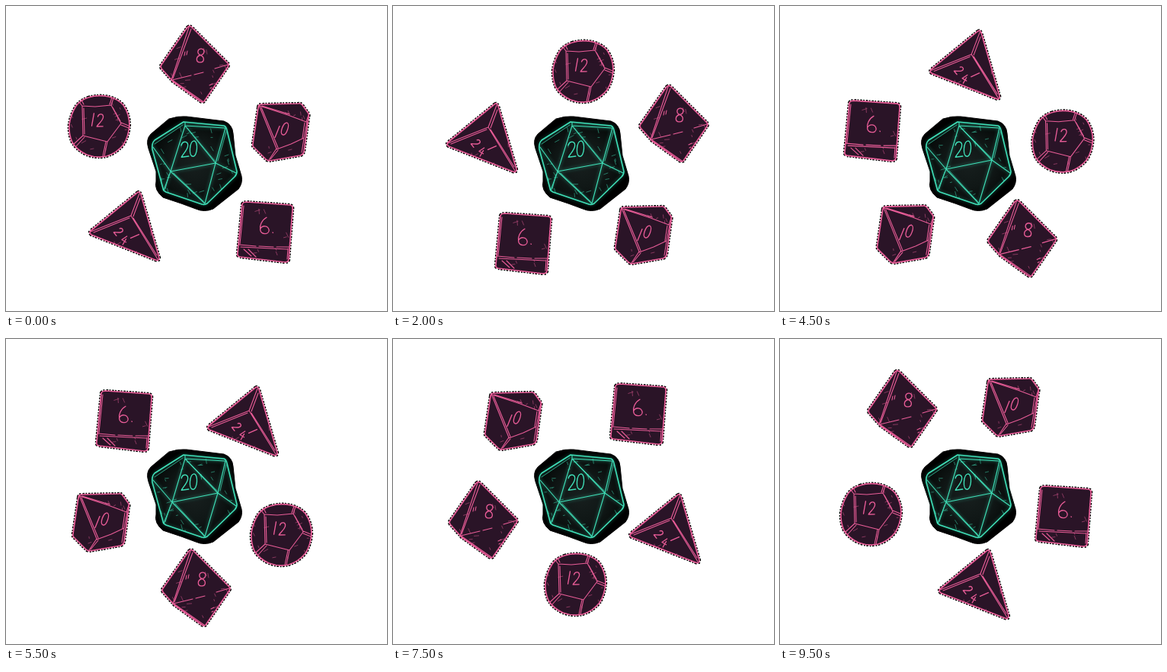
Write an HTML page that moves like this. It is 500 px wide and 400 px high and loops after 10 s.

```html
<!DOCTYPE html>
<html lang="en">
<head>
<meta charset="utf-8">
<title>Dice ring</title>
<style>
html, body { margin: 0; width: 100%; height: 100%; overflow: hidden; background: #fff; }
svg { display: block; width: 500px; height: 400px; }
path { fill: none; stroke-linecap: round; stroke-linejoin: round; }
.die { stroke: #e85c97; }
.d20 { stroke: #3fe0b8; }
</style>
</head>
<body>
<svg id="stage" viewBox="0 0 500 400" role="img" aria-label="Dice circling a twenty-sided die">
  <defs>
    <radialGradient id="shade">
      <stop offset="0" stop-color="#171f1e"/>
      <stop offset=".6" stop-color="#101716"/>
      <stop offset="1" stop-color="#070b0a"/>
    </radialGradient>
    <filter id="soft"><feGaussianBlur stdDeviation="2"/></filter>
  </defs>
</svg>
<script>
const NS = 'http://www.w3.org/2000/svg';
const stage = document.getElementById('stage');
const STEP = 500, STEPS = 20, CX = 243, CY = 202;

// Hand-lettered digits in a box 8 wide and 17 high
const GLYPHS = {
  0: 'M4 0C-1 1-1 17 4 17C9 17 9 0 4 0Z',
  1: 'M4 0L4 17',
  2: 'M0 4C1-1 8-1 7 5C6 10 2 13 0 17L8 16',
  4: 'M5 0L0 10L9 10M6 5L6 17',
  6: 'M6 0C1 3-1 9 0 13C1 18 9 18 9 13C8 8 2 8 0 12',
  8: 'M4 8C-1 6 0 0 5 0C10 1 9 7 4 8C-2 10-1 17 4 17C10 17 10 10 4 8',
  '.': 'M4 16L4.3 16.3'
};

// Digits are [text, x, y, scale, turn]; keys are centres at the steps in KEYS
const KEYS = [0, 4, 7, 11, 13, 15, 19];
const DICE = [
  { name: '8', at: [248, 76],
    edge: 'M238 28Q241 25 244 28L291 75Q293 77 291 80L260 125Q258 127 255 125L219 99L204 82Q202 79 204 77Z',
    inner: 'M240 28L217 97M243 30L219 95M218 97L258 125M218 97L243 91M247 90L259 87M274 82L291 77M235 60L234 65M238 59L237 64M267 104L271 102M268 108L270 107',
    digits: [['8', 255, 65, 1.05, 4]],
    keys: [248, 76, 369, 154, 365, 248, 250, 326, 167, 305, 119, 237, 161, 91] },
  { name: '10', at: [361, 166],
    edge: 'M331 133Q331 129 336 129L383 128Q387 127 389 130L397 141Q398 143 397 146L391 191Q390 195 386 196L346 203Q343 203 341 201L325 185Q323 183 324 180Z',
    inner: 'M332 130L355 187L345 202M335 133L357 186M333 131L370 143L394 152L397 143M336 131L372 142M355 188L374 181L391 173L395 152M392 153L389 173M357 189L347 201M391 174L388 192',
    digits: [['1', 356, 165, .94, 22], ['0', 366, 161, .98, 20]],
    keys: [361, 166, 329, 301, 231, 328, 125, 241, 127, 167, 158, 108, 303, 90] },
  { name: '6', at: [340, 296],
    edge: 'M310 260Q311 257 316 257L373 261Q377 262 376 267L371 333Q370 336 366 336L307 329Q303 328 304 324Z',
    inner: 'M306 313L328 315M332 315L351 316M355 316L372 316M308 316L369 319M312 319L322 328M318 319L328 329M370 318L369 332M312 262L307 312',
    digits: [['6', 339, 288, 1.28, 2], ['.', 350, 288, 1.2, 0]],
    keys: [340, 296, 171, 311, 119, 228, 155, 107, 236, 89, 322, 98, 372, 232] },
  { name: '4', at: [155, 289],
    edge: 'M172 245Q175 242 177 247L201 330Q201 335 196 333L112 300Q108 297 112 294Z',
    inner: 'M111 296L164 275L175 246M164 275L199 332M115 297L162 278M167 276L176 252M167 278L198 327',
    digits: [['2', 148, 296, .72, 58], ['4', 155, 307, .72, 30], ['1', 169, 302, .7, 66]],
    keys: [155, 289, 116, 173, 164, 94, 310, 108, 360, 169, 356, 249, 254, 322] },
  { name: '12', at: [122, 158],
    edge: 'M108 120Q121 116 135 119Q147 122 154 130Q162 142 162 156Q161 171 154 182Q145 193 132 197Q119 200 106 195Q93 189 87 179Q82 168 83 155Q85 142 92 131Q98 123 108 120Z',
    inner: 'M100 131L117 132L138 130L151 154L133 178L101 170ZM102 134L103 168M100 131L96 126M102 129L99 123M138 130L141 121M136 129L139 120M151 153L161 157M151 156L161 160M133 178L129 197M131 178L127 197M101 170L89 181M103 172L92 184M140 133L150 151',
    digits: [['1', 114, 149, .98, 10], ['2', 124, 150, 1, 6]],
    keys: [122, 158, 249, 86, 332, 108, 361, 257, 323, 306, 239, 322, 119, 230] }
];

function add(parent, tag, attrs) {
  const el = document.createElementNS(NS, tag);
  for (const key in attrs) el.setAttribute(key, attrs[key]);
  return parent.appendChild(el);
}

function line(parent, d, width, extra) {
  return add(parent, 'path', { d, 'stroke-width': width, ...extra });
}

function random(seed) {
  return () => (seed = seed * 16807 % 2147483647) / 2147483647;
}

function drawDigit(parent, [ch, x, y, scale, turn], width) {
  line(parent, GLYPHS[ch], width / scale, {
    transform: `translate(${x} ${y}) rotate(${turn}) scale(${scale}) translate(-4 -8.5)`
  });
}

// Short scratches scattered around the rim of a face
function scratches(parent, clip, x, y, radius, count, seed) {
  const rnd = random(seed);
  let d = '';
  for (let i = 0; i < count; i++) {
    const a = rnd() * 2 * Math.PI, r = radius * (.55 + .45 * rnd());
    const turn = (i % 2 ? -.5 : 1) + rnd() * .5, len = 2 + rnd() * 5;
    d += `M${(x + r * Math.cos(a)).toFixed(1)} ${(y + r * Math.sin(a)).toFixed(1)}`
       + `l${(len * Math.cos(turn)).toFixed(1)} ${(len * Math.sin(turn)).toFixed(1)}`;
  }
  line(parent, d, .7, { 'clip-path': `url(#${clip})`, opacity: .7 });
}

function clipFor(id, d) {
  add(add(stage.querySelector('defs'), 'clipPath', { id }), 'path', { d });
}

function drawDie(die, i) {
  const clip = 'clip' + die.name;
  clipFor(clip, die.edge);
  die.node = add(stage, 'g', { class: 'die', 'aria-label': die.name });
  line(die.node, die.edge, 4.2, {
    style: 'stroke:#000;stroke-linecap:butt', 'stroke-dasharray': '2.6 1.4 1.8 1.8'
  });
  line(die.node, die.edge, 1.7, { style: 'fill:#2a1427' });
  line(die.node, die.inner, 1.1);
  scratches(die.node, clip, ...die.at, 42, 17, 911 + i * 137);
  die.digits.forEach(g => drawDigit(die.node, g, 1.35));
}

const BLOB = 'M214 148Q226 144 237 145L286 151Q297 155 298 167L301 196L309 223Q311 232 305 240L272 266Q260 271 249 266L230 259L206 251Q194 241 197 230L197 217L187 187Q183 175 190 168Z';

function drawCentre(left, right, seed) {
  const g = add(stage, 'g', { class: 'd20', 'aria-label': '20' });
  const edge = 'M233 152L286 157Q289 158 290 163L303 217Q303 221 300 224L264 259Q261 261 257 260L210 244Q206 242 206 239L192 188Q191 180 195 176Z';
  const a = left.join(' '), b = right.join(' ');
  const net = `M235 157L${a}L${b}ZM193 185L${a}L207 242M${a}L261 259L${b}L288 160M${b}L302 219M235 157L287 160M235 153L235 157`;
  const clip = 'clip20' + seed;
  clipFor(clip, edge);
  line(g, BLOB, 1, { style: 'fill:#000;stroke:#000' });
  line(g, edge, 0, { style: 'fill:url(#shade);stroke:none' });
  line(g, edge + net, 3, { filter: 'url(#soft)', opacity: .28 });
  line(g, edge, 1.6);
  line(g, net, 1.1);
  line(g, `M238 160L${right[0] - 1} ${right[1] - 3}M${left[0] + 4} ${left[1] + 2}L259 256`
    + `M${left[0] - 2} ${left[1] + 4}L209 240M${right[0] + 3} ${right[1] - 3}L289 165M195 181L232 156`, .7);
  scratches(g, clip, 247, 207, 52, 34, seed);
  [['2', 235, 188, 1.2, 0], ['0', 246, 187, 1.2, 4]].forEach(d => drawDigit(g, d, 1.4));
  return g;
}

const centres = [
  drawCentre([216, 217], [275, 206], 4021),
  drawCentre([218, 214], [278, 202], 7753)
];
DICE.forEach(drawDie);

function polar(x, y) {
  return [Math.atan2(y - CY, x - CX), Math.hypot(x - CX, y - CY)];
}

// Moves clockwise around the centre between two neighbouring key places
function place(die, step) {
  let i = KEYS.length - 1;
  while (KEYS[i] > step) i--;
  const n = (i + 1) % KEYS.length, span = (KEYS[n] || STEPS) - KEYS[i];
  const p = (step - KEYS[i]) / span;
  const [a0, r0] = polar(die.keys[2 * i], die.keys[2 * i + 1]);
  let [a1, r1] = polar(die.keys[2 * n], die.keys[2 * n + 1]);
  if (a1 < a0) a1 += 2 * Math.PI;
  const a = a0 + (a1 - a0) * p, r = r0 + (r1 - r0) * p;
  return [CX + r * Math.cos(a), CY + r * Math.sin(a)];
}

function render(time) {
  const step = Math.floor(time / STEP) % STEPS;
  for (const die of DICE) {
    const [x, y] = place(die, step);
    die.node.setAttribute('transform',
      `translate(${(x - die.at[0]).toFixed(1)} ${(y - die.at[1]).toFixed(1)})`);
  }
  centres.forEach((g, i) => g.setAttribute('display', step % 2 === i ? 'inline' : 'none'));
}

function tick() {
  render(performance.now());
  requestAnimationFrame(tick);
}
render(0);
requestAnimationFrame(tick);
</script>
</body>
</html>
```
